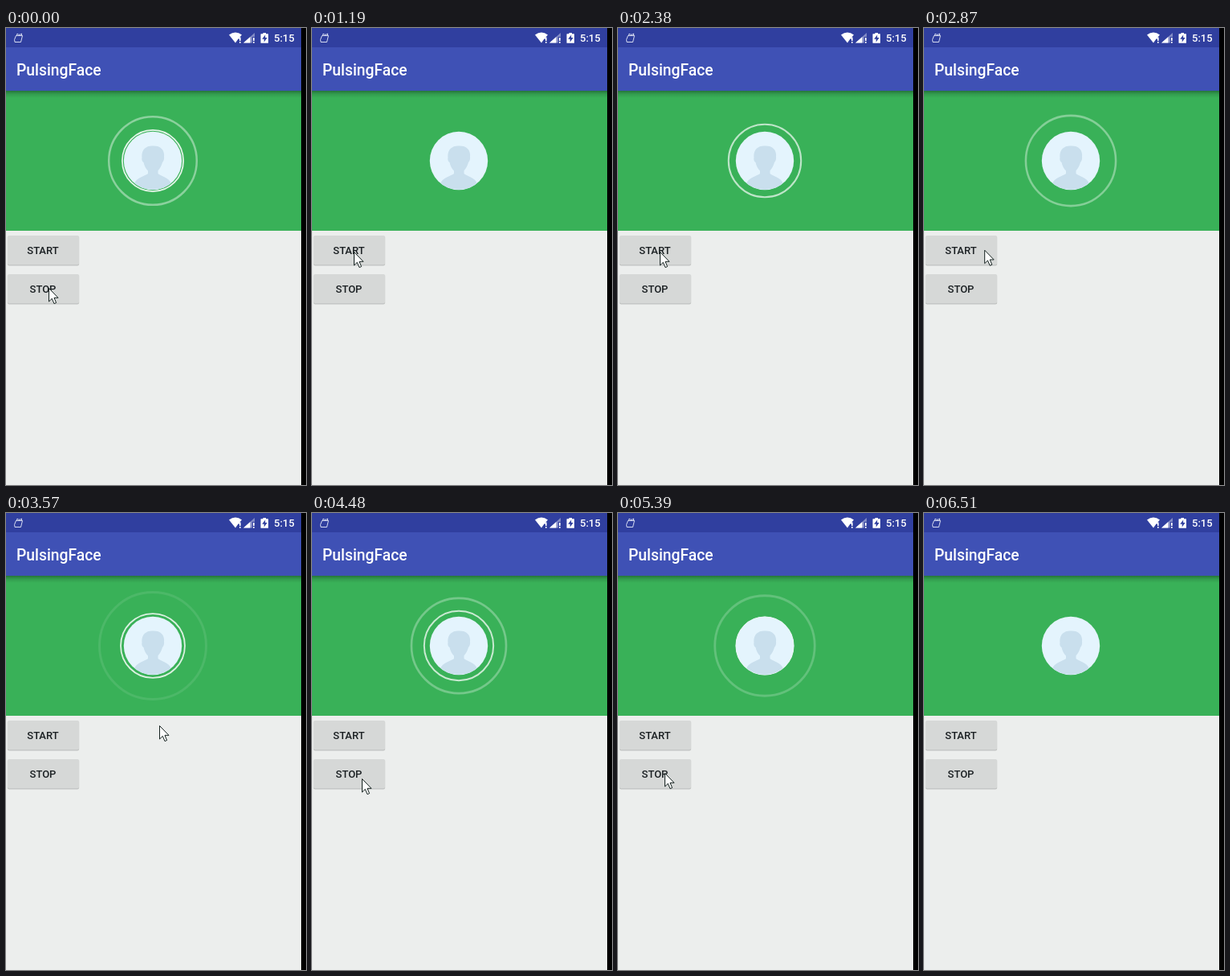
Write an HTML page that moves like this. It is 374 by 568 pixels and loops after 6.93 s.

```html
<!DOCTYPE html>
<html lang="en">
<head>
<meta charset="utf-8">
<title>PulsingFace</title>
<style>
  html, body { margin: 0; width: 100%; height: 100%; overflow: hidden; background: #eceeed; }
  svg { display: block; }
  text { font-family: Roboto, sans-serif; font-weight: 500; }
  .label { font-size: 13px; fill: #1b2023; text-anchor: middle; }
</style>
</head>
<body>
<svg width="374" height="568" viewBox="0 0 374 568">
  <defs>
    <linearGradient id="shade" x1="0" y1="0" x2="0" y2="1">
      <stop offset="0" stop-color="#000" stop-opacity=".34"/>
      <stop offset=".45" stop-color="#000" stop-opacity=".12"/>
      <stop offset="1" stop-color="#000" stop-opacity="0"/>
    </linearGradient>
    <clipPath id="face"><circle cx="183" cy="165" r="36"/></clipPath>
    <clipPath id="keys">
      <rect x="2" y="258" width="89" height="36.5" rx="2"/>
      <rect x="2" y="306" width="89" height="36.5" rx="2"/>
    </clipPath>
  </defs>

  <rect width="374" height="568" fill="#eceeed"/>
  <rect y="78" width="368" height="174" fill="#39b158"/>
  <rect y="78" width="368" height="9" fill="url(#shade)"/>
  <rect width="368" height="78" fill="#3f51b5"/>
  <rect width="368" height="24" fill="#303f9f"/>

  <!-- status bar -->
  <path d="M12.5 9.5h8l-2 8h-7.500l-.5-3zM13.500 9.500l.5-2.500 1.500 1.200h2.500l1.500-1.200v2.500" fill="none" stroke="#d5daf0"/>
  <g fill="#fff">
    <path d="M278 8.500q8-6 16 0l-3 3.500v1.500h-1.500L286 18.500z"/>
    <path d="M291 11.500h1.600v4.500h-1.600zM291 17h1.600v1.700h-1.600z"/>
    <path d="M296 18.500L310 6v5h-3v7.500z" opacity=".4"/>
    <path d="M296 18.500L304.500 11v7.500zM308 12h1.700v4h-1.700zM308 17h1.700v1.700h-1.700z"/>
    <path d="M320.500 6h3.500v1.300h2.500q.5 0 .5.500v10.400q0 .6-.6.600h-8.300q-.6 0-.6-.6V7.800q0-.5.500-.5h2.500z"/>
    <path d="M323.200 8.500l-4 5.200h2.500v3.800l4-5.500h-2.500z" fill="#303f9f"/>
    <text x="334" y="17.300" font-size="13">5:15</text>
    <text x="13" y="59" font-size="19.300">PulsingFace</text>
  </g>

  <g id="rings" fill="none" stroke="#fff"></g>

  <!-- avatar -->
  <circle cx="183" cy="165" r="36.200" fill="#e4f4fd"/>
  <g clip-path="url(#face)" fill="#c9dfed">
    <path d="M169.500 161C168.500 152 174 146.500 182 146.500C192 145.500 198 151 197 160C197.500 164 196 166 195 167C193.500 173 190.500 176 189.500 177.500V181C192 184 204 185.500 206 194V203H160V194C162 185.500 174 184 177 181V177.500C175 175.500 172.500 172 171.500 167C169.500 166 169 163.500 169.500 161z"/>
  </g>

  <!-- buttons -->
  <g id="buttons"></g>
  <g clip-path="url(#keys)"><circle id="touch" fill="#000"/></g>
  <text class="label" x="46" y="281">START</text>
  <text class="label" x="46" y="329">STOP</text>

  <rect x="368" width="6" height="568"/>
  <path id="cursor" d="M.5.5V17L4.300 13.300L7 19.600L9.600 18.500L7 12.300H12z" fill="#fff" stroke="#14211f" stroke-linejoin="round"/>
</svg>
<script>
const LOOP = 6930, STEP = 70, PERIOD = 2200;
const INNER = 36, OUTER = 68.5;

// Each run of the ripple: when it shows and when its rings set off
const RUNS = [
  { from: 0, to: 280, starts: [-1265, -430] },
  { from: 1545, to: 5810, starts: [1545, 3013] }
];

// Presses: time, x, y
const TAPS = [[210, 53, 324], [1400, 52, 279], [5670, 58, 324]];

// Pointer path: time, x, y
const PATH = [
  [0, 53, 323], [910, 53, 323], [1190, 52, 278], [2800, 52, 278],
  [3220, 191, 264], [3640, 191, 264], [4060, 99, 313], [4340, 62, 330],
  [4830, 62, 330], [5040, 58, 323], [5880, 58, 323], [6160, 245, 466],
  [6440, 304, 570]
];

const $ = id => document.getElementById(id);
const ease = p => (1 - Math.cos(Math.PI * p)) / 2;

function add(parent, tag, attrs) {
  const el = document.createElementNS('http://www.w3.org/2000/svg', tag);
  set(el, attrs);
  return parent.appendChild(el);
}

function set(el, attrs) {
  for (const key in attrs) el.setAttribute(key, attrs[key]);
}

for (const y of [258, 306]) {
  const box = { x: 2, width: 89, height: 36.5, rx: 2 };
  add($('buttons'), 'rect', { ...box, x: 1.5, width: 90, y: y + 0.4, fill: '#000', opacity: 0.06 });
  add($('buttons'), 'rect', { ...box, y: y + 1, fill: '#000', opacity: 0.18 });
  add($('buttons'), 'rect', { ...box, y, fill: '#d6d8d7' });
}

const rings = [0, 1].map(() => add($('rings'), 'circle', { cx: 183, cy: 165 }));

function drawRings(t) {
  const run = RUNS.find(r => t >= r.from && t < r.to);
  rings.forEach((ring, i) => {
    const age = run ? t - run.starts[i] : -1;
    if (age < 0) return set(ring, { opacity: 0 });
    const e = ease(age % PERIOD / PERIOD);
    const edge = INNER + (OUTER - INNER) * e;
    const width = 1.6 * edge / INNER;
    set(ring, { r: edge - width / 2, 'stroke-width': width, opacity: 0.95 - 0.87 * e });
  });
}

function drawTouch(t) {
  const tap = TAPS.find(([start]) => t >= start && t < start + 490);
  if (!tap) return set($('touch'), { opacity: 0 });
  const p = (t - tap[0]) / 490;
  set($('touch'), {
    cx: tap[1], cy: tap[2],
    r: 8 + 80 * Math.min(1, p * 1.6),
    opacity: 0.14 * Math.min(1, 2 - 2 * p)
  });
}

function drawCursor(t) {
  const next = PATH.findIndex(k => k[0] > t);
  if (next < 0) return set($('cursor'), { opacity: 0 });
  const [t0, x0, y0] = PATH[next - 1], [t1, x1, y1] = PATH[next];
  const p = (t - t0) / (t1 - t0);
  const x = x0 + (x1 - x0) * p, y = y0 + (y1 - y0) * p;
  set($('cursor'), { opacity: 1, transform: `translate(${x} ${y})` });
}

const origin = performance.now();

function frame() {
  const now = (performance.now() - origin) % LOOP;
  const t = Math.floor(now / STEP) * STEP;
  drawRings(t);
  drawTouch(t);
  drawCursor(t);
  requestAnimationFrame(frame);
}
frame();
</script>
</body>
</html>
```
